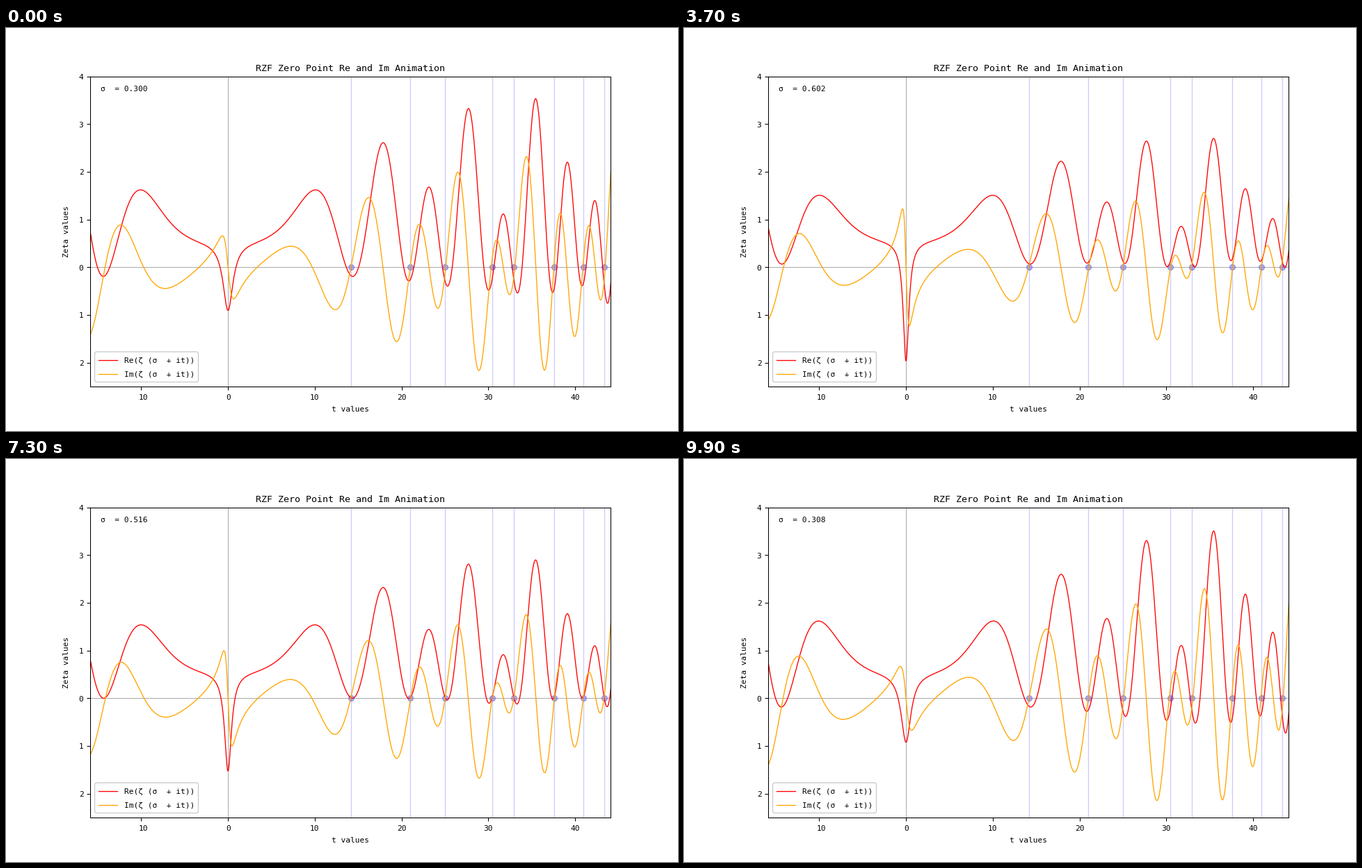
Recreate the animation shown at these times as a matplotlib script. Size 966x580 px, loop 10 s.

```python
import numpy as np
import matplotlib.pyplot as plt
from matplotlib.animation import FuncAnimation
from matplotlib.patches import FancyBboxPatch

W, H, DPI = 966, 580, 96
FRAMES, HALF = 100, 50
LOW, HIGH = 0.3, 0.7
T_MIN, T_MAX = -15.9, 44.1
Y_MIN, Y_MAX = -2.5, 4
ZEROS = [14.134725, 21.022040, 25.010858, 30.424876,
         32.935062, 37.586178, 40.918719, 43.327073]
TERMS = 60
BODY, TITLE = 8.36, 10.03

plt.rcParams["font.family"] = "DejaVu Sans Mono"

t = np.linspace(T_MIN, T_MAX, 1501)
n = np.arange(1, TERMS)
phases = np.exp(-1j * np.outer(np.log(n), t))


def zeta(sigma):
    """Euler-Maclaurin value of zeta(sigma + it) for every t."""
    s = sigma + 1j * t
    tail = TERMS ** -s
    total = n ** -sigma @ phases
    total += tail * TERMS / (s - 1) + tail / 2
    total += s * tail / (12 * TERMS)
    total -= s * (s + 1) * (s + 2) * tail / (720 * TERMS ** 3)
    return total


def sigma_at(i):
    if i < HALF:
        return LOW + (HIGH - LOW) * i / (HALF - 1)
    return HIGH - (HIGH - LOW) * (i - HALF) / HALF


fig = plt.figure(figsize=(W / DPI, H / DPI), dpi=DPI, facecolor="white")

ax = fig.add_axes([0.125, 0.11, 0.775, 0.77])
ax.set(xlim=(T_MIN, T_MAX), ylim=(Y_MIN, Y_MAX),
       xticks=range(-10, 41, 10), yticks=range(-2, 5))
ax.tick_params(length=3.52, width=0.8, labelbottom=False, labelleft=False)
ax.axhline(0, color="gray", lw=0.5)
ax.axvline(0, color="gray", lw=0.5)
for z in ZEROS:
    ax.axvline(z, color="blue", lw=1, alpha=0.2)
    ax.scatter(z, 0, s=36, color="blue", alpha=0.3, zorder=1)
re_line, = ax.plot([], [], color="red", lw=1)
im_line, = ax.plot([], [], color="orange", lw=1)

# Overlay in pixel coordinates for all lettering
page = fig.add_axes([0, 0, 1, 1], facecolor="none")
page.set(xlim=(0, W), ylim=(H, 0))
page.axis("off")


def label(x, y, text, size=BODY, ha="center", va="baseline", **kw):
    return page.text(x, y, text, fontsize=size, ha=ha, va=va, **kw)


left, right = 0.125 * W, 0.9 * W
top, bottom = 0.12 * H, 0.89 * H
mid_x, mid_y = (left + right) / 2, (top + bottom) / 2

label(mid_x, 61.5, "RZF Zero Point Re and Im Animation", TITLE)
label(mid_x, 552.5, "t values")
label(90, mid_y, "Zeta values", rotation=90, rotation_mode="anchor")

# Negative ticks carry no visible sign, only its space
for v in range(-10, 41, 10):
    x = left + (v - T_MIN) / (T_MAX - T_MIN) * (right - left)
    label(x + (3 if v < 0 else 0), 535.3, str(abs(v)))
for v in range(-2, 5):
    y = bottom - (v - Y_MIN) / (Y_MAX - Y_MIN) * (bottom - top)
    label(108, y + 4.3, str(abs(v)))

page.add_patch(FancyBboxPatch(
    (127.5, 466), 149, 43.5, boxstyle="round,pad=0,rounding_size=2.7",
    facecolor=(1, 1, 1, 0.8), edgecolor="0.8", lw=1))
for y, part, color in ((478, "Re", "red"), (498, "Im", "orange")):
    page.plot([132.8, 159.6], [y, y], color=color, lw=1)
    label(170.3, y + 4.5, part + "(ζ (σ  + it))", ha="left")

readout = label(135.7, 91, "", ha="left")


def draw(i):
    sigma = sigma_at(i)
    values = zeta(sigma)
    re_line.set_data(t, values.real)
    im_line.set_data(t, values.imag)
    readout.set_text(f"σ  = {sigma:.3f}")
    return re_line, im_line, readout


anim = FuncAnimation(fig, draw, frames=FRAMES, interval=100, repeat=True)
plt.show()
```
